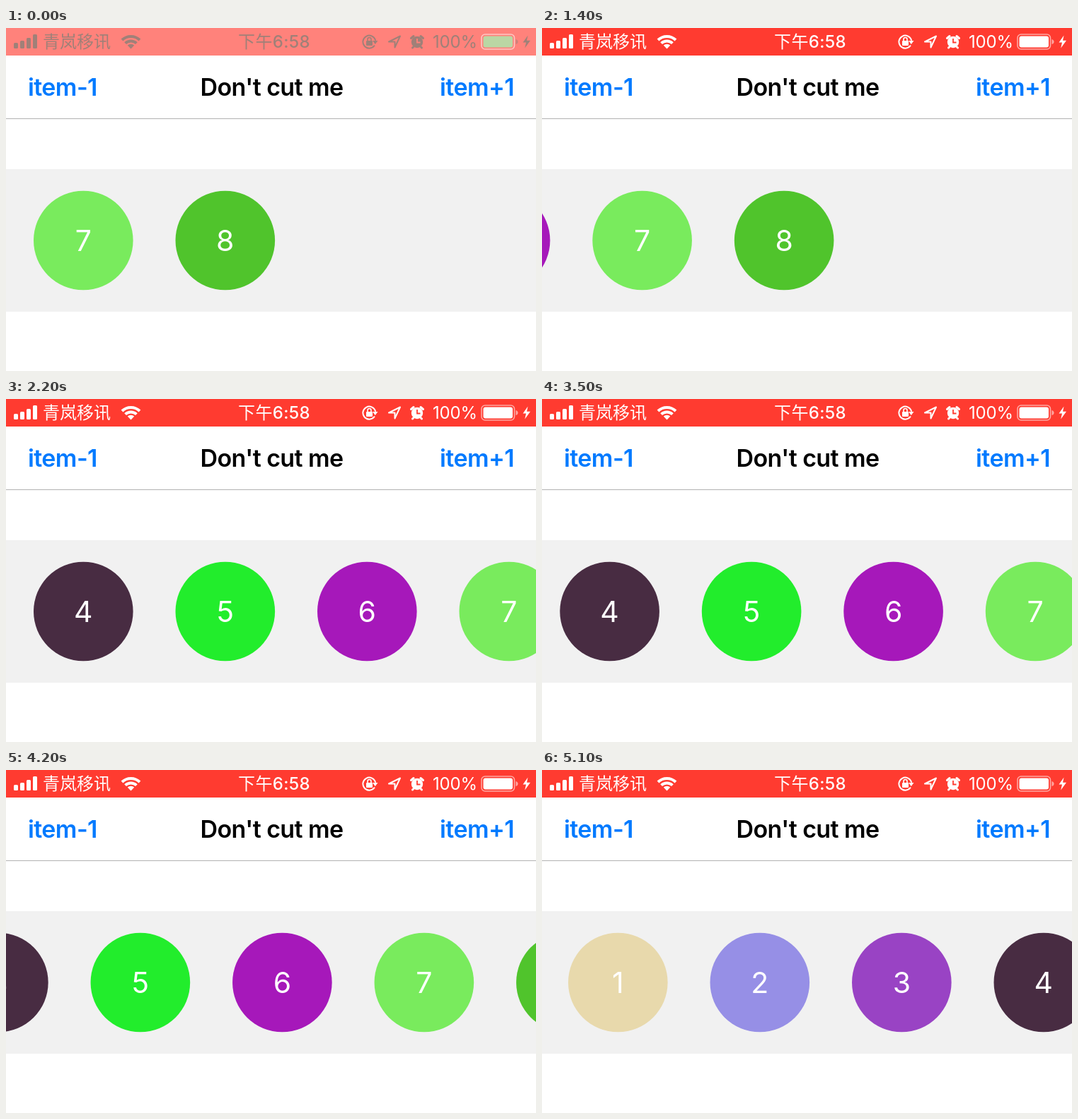
Recreate the animation shown at these times as an HTML page. Size 749x486 px, loop 5200 ms.

```html
<!DOCTYPE html>
<html lang="zh">
<head>
<meta charset="utf-8">
<title>Paged strip</title>
<style>
  html, body { margin: 0; width: 100%; height: 100%; overflow: hidden; background: #fff; }
  svg { display: block; width: 749px; height: 486px; --ink: #fff; }
  text { font-family: Inter, "Noto Sans CJK SC", sans-serif; }
  .status { fill: var(--ink); }
  .status text { font-size: 24px; }
  .line { fill: none; stroke: var(--ink); stroke-width: 2; stroke-linecap: round; stroke-linejoin: round; }
  .nav { font-size: 34px; font-weight: 600; letter-spacing: -.6px; }
  .link { fill: #007aff; }
  .ball text { font-size: 41px; fill: #fff; text-anchor: middle; }
</style>
</head>
<body>
<svg viewBox="0 0 749 486">
  <rect id="bar" width="749" height="39"/>
  <g class="status">
    <rect x="11" y="21" width="6" height="8" rx="1.5"/>
    <rect x="20" y="18" width="6" height="11" rx="1.5"/>
    <rect x="29" y="14" width="6" height="15" rx="1.5"/>
    <rect x="38" y="9" width="6" height="20" rx="1.5"/>
    <text x="52" y="28" font-weight="300">青岚移讯</text>

    <g class="line" style="stroke-width:4;stroke-linecap:butt">
      <path d="M164 17A18 18 0 0 1 189 17"/>
      <path d="M168.6 21.6A11.5 11.5 0 0 1 184.4 21.6"/>
    </g>
    <path d="M171.8 24.6A6.8 6.8 0 0 1 181.2 24.6L176.5 29.5Z"/>

    <text x="379" y="28" text-anchor="middle" font-weight="500" letter-spacing=".3">下午6:58</text>

    <path class="line" d="M520.5 25.2A9 9 0 1 1 522 17"/>
    <path d="M518 18H525.5L521.8 23Z"/>
    <rect x="509" y="18" width="9" height="7" rx="1"/>
    <path class="line" style="stroke-width:1.6" d="M511 18V16A2.5 2.5 0 0 1 516 16V18"/>

    <path class="line" d="M541 19.5L557 11.5L549.5 27.5V19.5Z"/>

    <circle cx="581" cy="20" r="8.2"/>
    <path class="line" style="stroke-width:3" d="M572.5 14.5L576 11.5M589.5 14.5L586 11.5M575.5 27L574.5 28M586.5 27L587.5 28"/>
    <path id="hands" d="M581 15V20.5H585.5" fill="none" stroke-width="1.8"/>

    <text x="603" y="28" letter-spacing="-.2">100%</text>

    <rect id="shell" x="672" y="9" width="46.5" height="21" rx="5" fill="none" stroke="#fff" stroke-opacity=".55" stroke-width="1.6"/>
    <rect id="charge" x="674.5" y="11.5" width="41.5" height="16" rx="3"/>
    <path d="M720.5 16Q723.5 17 723.5 19.5Q723.5 22 720.5 23Z" opacity=".55"/>
    <path d="M737.5 10.5L730.5 20.5H735L733.2 28.5L741 17.8H736Z"/>
  </g>

  <g class="nav">
    <text class="link" x="31" y="96">item-1</text>
    <text x="375.5" y="96" text-anchor="middle">Don't cut me</text>
    <text class="link" x="718" y="96" text-anchor="end">item+1</text>
  </g>
  <rect y="128" width="749" height="1" fill="#b2b2b2"/>
  <rect y="200" width="749" height="202" fill="#f1f1f1"/>
  <g id="strip"></g>
</svg>
<script>
const LOOP = 5200, TICK = 100, PITCH = 200.5, PAGE = 3 * PITCH;
const colors = ['#e8d9ac', '#968fe6', '#9943c4', '#482c42', '#22ed2c', '#a618ba', '#79eb5d', '#50c42c'];
const $ = id => document.getElementById(id);
const svg = document.querySelector('svg');

$('strip').innerHTML = colors.map((c, i) =>
  `<g class="ball" transform="translate(${109.3 + i * PITCH} 301)">
    <circle r="70.3" fill="${c}"/><text y="15">${i + 1}</text></g>`).join('');

const mix = (a, b, k) => `rgb(${a.map((v, i) => Math.round(v + (b[i] - v) * k))})`;
const settle = (from, to, dt) => to + (from - to) * Math.exp(-dt / 115);

// Scroll offset: swipe back a page, drag forward, then fling back to the start.
function offset(t) {
  if (t < 1300) return 2 * PAGE;
  if (t < 1500) return 2 * PAGE - 148.5 * ((t - 1300) / 200) ** 2.2;
  if (t < 2200) return settle(1054.5, PAGE, t - 1500);
  if (t < 3400) return PAGE;
  if (t < 4000) return PAGE + (806 - PAGE) * (1 - Math.cos(Math.PI * (t - 3400) / 600)) / 2;
  if (t < 4500) return 806 - 440 * ((t - 4000) / 500) ** 1.8;
  return settle(366, 0, t - 4500);
}

function draw(now) {
  const t = Math.floor(now % LOOP / TICK) * TICK;
  const fade = t < 100 ? 0 : t < 200 ? .7 : 1;
  const white = [255, 255, 255];
  const red = mix([255, 130, 123], [255, 59, 48], fade);
  svg.style.setProperty('--ink', mix([160, 128, 120], white, fade));
  $('bar').setAttribute('fill', red);
  $('hands').setAttribute('stroke', red);
  $('charge').setAttribute('fill', mix([186, 215, 164], white, fade));
  $('strip').setAttribute('transform', `translate(${-offset(t)} 0)`);
  requestAnimationFrame(draw);
}
draw(performance.now());
</script>
</body>
</html>
```
